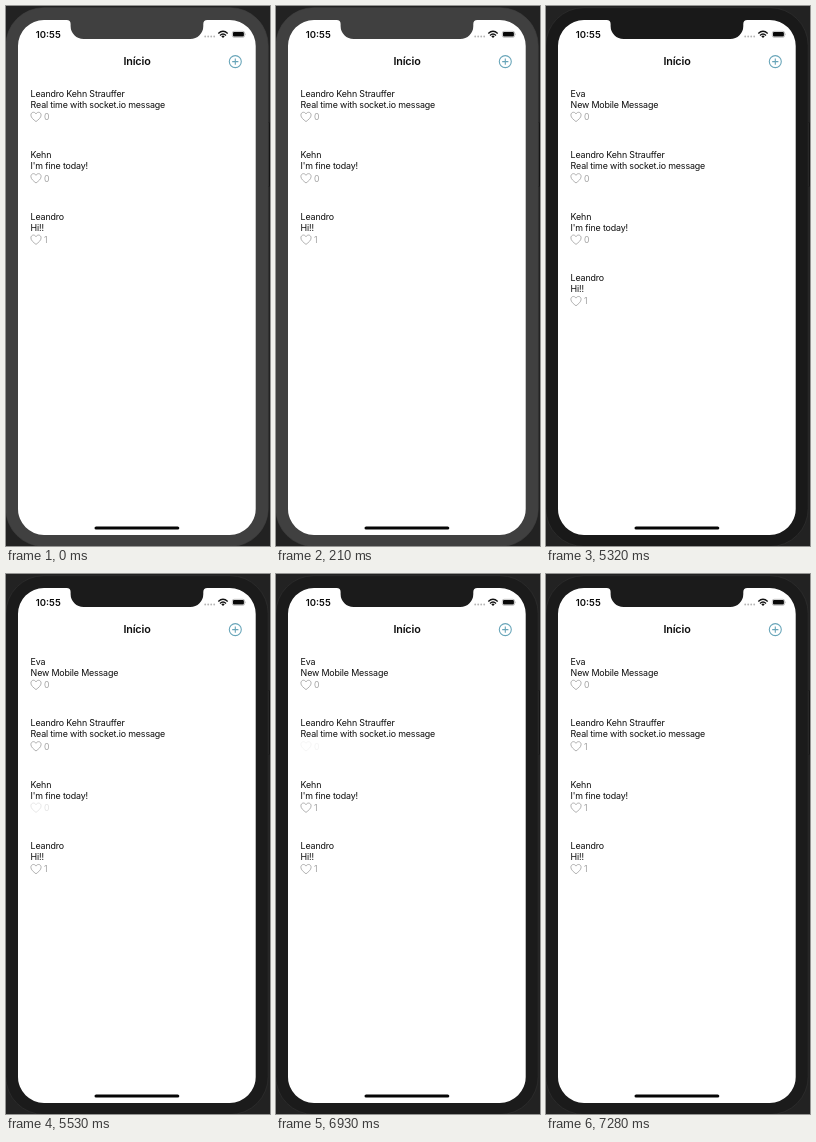
Animation, 264 px wide and 540 px high, one loop 8000 ms. Source, as an HTML page:

```html
<!DOCTYPE html>
<html lang="pt">
<head>
<meta charset="utf-8">
<style>
  html, body { margin: 0; width: 100%; height: 100%; overflow: hidden; background: #222; }
  svg { display: block; width: 264px; height: 540px; }
  text { font: 8.88px Inter, Roboto, sans-serif; letter-spacing: -.15px; fill: #0c0c0c; }
  text.clock { font-size: 9.5px; font-weight: 600; letter-spacing: 0; }
  text.title { font-size: 10.8px; font-weight: 600; text-anchor: middle; }
  .like text { font-size: 8.7px; fill: #a0a0a0; }
  .like path { fill: none; stroke: #a3a3a3; stroke-width: .85; stroke-linejoin: round; }
</style>
</head>
<body>
<svg viewBox="0 0 264 540">
  <rect width="264" height="540" fill="#222"/>
  <rect x="260" y="116.500" width="3.500" height="64" rx="1" fill="#262626" stroke="#111" stroke-width=".7"/>
  <rect id="bezel" x="-.2" y="1.700" width="262.400" height="538.800" rx="38" stroke-width=".6"/>
  <!-- screen with notch -->
  <path fill="#fff" d="M38 14H60.600A4 4 0 0 1 64.600 18V20A13 13 0 0 0 77.600 33H184.300A13 13 0 0 0 197.300 20V18A4 4 0 0 1 201.300 14H223.700A26 26 0 0 1 249.700 40V502.900A26 26 0 0 1 223.700 528.900H38A26 26 0 0 1 12 502.900V40A26 26 0 0 1 38 14Z"/>

  <text class="clock" x="29.800" y="32">10:55</text>
  <g fill="#b5b5b5">
    <circle cx="199.200" cy="30.500" r=".9"/><circle cx="202.200" cy="30.500" r=".9"/>
    <circle cx="205.200" cy="30.500" r=".9"/><circle cx="208.200" cy="30.500" r=".9"/>
  </g>
  <g fill="none" stroke="#111" stroke-width="1.400">
    <path d="M212.300 27.500Q217 23.200 221.700 27.500M214 29.400Q217 26.700 220 29.400"/>
    <path d="M215.300 30.200Q217 28.900 218.700 30.200L217 32Z" fill="#111" stroke="none"/>
  </g>
  <rect x="226.300" y="25.300" width="12.300" height="6" rx="1.700" fill="none" stroke="#999" stroke-width=".6"/>
  <rect x="227" y="26" width="10.900" height="4.600" rx="1" fill="#080808"/>
  <path d="M239.300 27.300Q240.500 28.300 239.300 29.300Z" fill="#999"/>

  <text class="title" x="131" y="59">Início</text>
  <path d="M223.300 55.600a6 6 0 1 0 12 0a6 6 0 1 0-12 0M226.200 55.600h6.200M229.300 52.500v6.200" fill="none" stroke="#68a5b9" stroke-width="1.100"/>
  <g id="list"></g>
  <rect x="88.500" y="520.400" width="84.800" height="3.200" rx="1.600" fill="#050505"/>
</svg>
<script>
const LOOP = 8000, ROW = 61.4, ARRIVAL = 2940, BLUR = 5320;
const HEART = 'M30 115.600C27.500 113.600 24.900 111.700 24.900 109.100C24.900 106 28.500 105.200 30 107.900C31.500 105.200 35.100 106 35.100 109.100C35.100 111.700 32.500 113.600 30 115.600Z';
const list = document.getElementById('list');
const bezel = document.getElementById('bezel');

// taps: [time, opacity, count] steps of the like button
const posts = [
  { name: 'Eva', text: 'New Mobile Message', likes: 0 },
  { name: 'Leandro Kehn Strauffer', text: 'Real time with socket.io message', likes: 0,
    taps: [[6930, .12, 0], [7140, .4, 0], [7210, .75, 1], [7280, 1, 1]] },
  { name: 'Kehn', text: "I'm fine today!", likes: 0,
    taps: [[5530, .3, 0], [5600, .65, 1], [5670, 1, 1]] },
  { name: 'Leandro', text: 'Hi!!', likes: 1 }
];

for (const post of posts) {
  const row = document.createElementNS('http://www.w3.org/2000/svg', 'g');
  row.innerHTML = `<text x="24.600" y="91">${post.name}</text>
    <text x="24.600" y="101.800">${post.text}</text>
    <g class="like"><path d="${HEART}"/><text x="38" y="114.200"></text></g>`;
  list.append(row);
  post.row = row;
  post.like = row.querySelector('.like');
  post.count = post.like.querySelector('text');
}

function draw(now) {
  const t = now % LOOP;
  const arrived = t >= ARRIVAL;
  const blurred = t >= BLUR;
  bezel.setAttribute('fill', !blurred ? '#404040' : t < BLUR + 70 ? '#191919' : '#1b1b1b');
  bezel.setAttribute('stroke', blurred ? '#333' : '#404040');
  posts.forEach((post, i) => {
    const slot = arrived ? i : i - 1;
    post.row.setAttribute('display', slot < 0 ? 'none' : 'inline');
    post.row.setAttribute('transform', `translate(0 ${slot * ROW})`);
    let opacity = 1, likes = post.likes;
    for (const [start, alpha, count] of post.taps || [])
      if (t >= start) [opacity, likes] = [alpha, count];
    post.like.setAttribute('opacity', opacity);
    post.count.textContent = likes;
  });
}

const begin = performance.now();
function tick() {
  draw(performance.now() - begin);
  requestAnimationFrame(tick);
}
tick();
</script>
</body>
</html>
```
